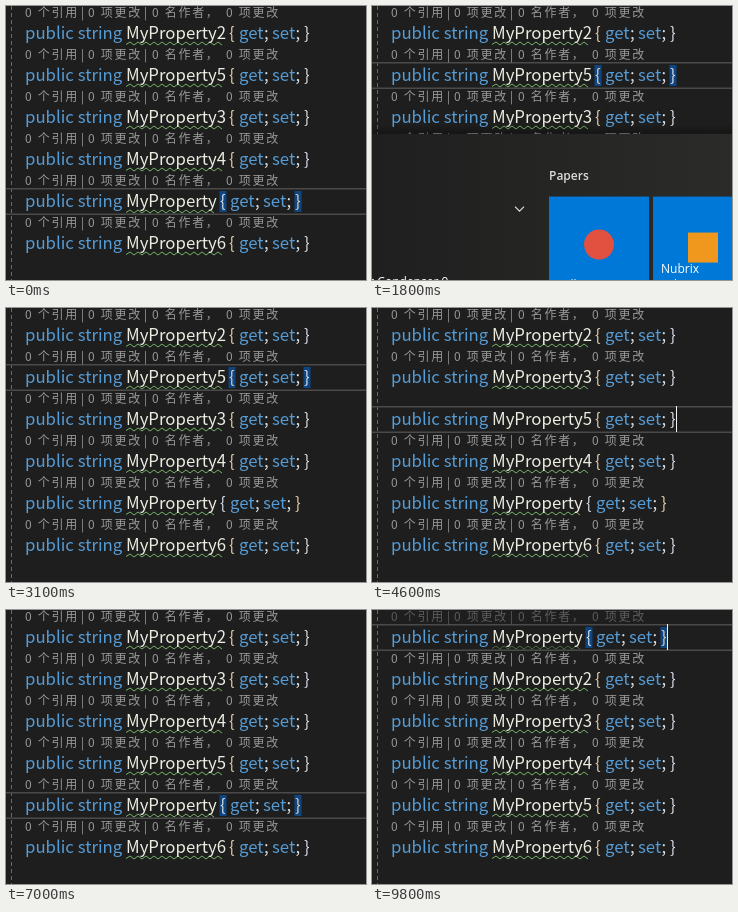
Write an HTML page that moves like this. It is 360x274 px and loops after 9900 ms.

```html
<!DOCTYPE html>
<html lang="zh">
<head>
<meta charset="utf-8">
<title>Moving lines of code</title>
<style>
html, body { margin: 0; width: 100%; height: 100%; overflow: hidden; background: #1e1e1e; }
svg { display: block; width: 360px; height: 274px; }
.code { font: 300 16.8px "Noto Sans CJK SC", "Noto Sans CJK", sans-serif; fill: #dcdcdc; }
.lens { font: 400 12px "Noto Sans CJK SC", "Noto Sans CJK", sans-serif; letter-spacing: 1.7px; fill: #999; }
.menu { font: 400 12px "Open Sans", "Noto Sans", sans-serif; fill: #fff; }
.kw { fill: #569cd6; }
.name { fill: #ecece0; }
.warm { fill: #e2cba6; }
.cold { fill: #d6dce4; }
</style>
</head>
<body>
<svg id="stage" viewBox="0 0 360 274">
  <defs>
    <linearGradient id="pane" x1="0" y1="0" x2="1" y2="0">
      <stop offset="0" stop-color="#1f1f1f"/><stop offset="1" stop-color="#2b2b29"/>
    </linearGradient>
    <linearGradient id="shade" x1="0" y1="0" x2="0" y2="1">
      <stop offset="0" stop-color="#000" stop-opacity="0"/><stop offset="1" stop-color="#000" stop-opacity=".3"/>
    </linearGradient>
  </defs>
  <rect width="360" height="274" fill="#1e1e1e"/>
  <path d="M5.5 0V274" stroke="#686868" stroke-dasharray="4 3"/>
  <g id="cursor">
    <path d="M0 14.75H360M0 40.25H360" stroke="#4a4a4a" stroke-width="1.5"/>
    <g id="marks" fill="#0e4583"><rect y="17" width="7" height="21"/><rect y="17" width="7" height="21"/></g>
  </g>
  <g id="rows"></g>
  <rect id="caret" y="14" width="1" height="26" fill="#f4f4f4"/>
  <g id="menu" class="menu">
    <g id="back">
      <rect y="105" width="360" height="10" fill="url(#shade)"/>
      <rect y="115" width="360" height="300" fill="url(#pane)"/>
    </g>
    <g id="items">
      <text x="177" y="147" font-weight="600" fill="#ddd">Papers</text>
      <path d="M143 174l4.5 4.5l4.5-4.5" fill="none" stroke="#ddd" stroke-width="1.2"/>
      <text x="-2" y="253">t Condenser 9</text>
      <g fill="#0078d7">
        <rect x="177" y="164" width="100" height="99"/><rect x="281" y="164" width="100" height="99"/>
        <rect x="177" y="267" width="100" height="99"/><rect x="281" y="267" width="100" height="99"/>
      </g>
      <circle cx="227" cy="212" r="15" fill="#e2513f"/>
      <rect x="316" y="200" width="30" height="30" fill="#f0981e"/>
      <text x="185" y="256">Zelkin</text>
      <text x="289" y="240">Nubrix</text>
      <text x="289" y="256">Laboratories...</text>
    </g>
  </g>
</svg>
<script>
const LOOP = 9900, PITCH = 42;
const $ = id => document.getElementById(id);

// time, order of the properties, current row
const STATES = [
  [0, "2534P6", 4], [600, "2534P6", 1], [4500, "2354P6", 2],
  [5100, "2345P6", 3], [6300, "2345P6", 4], [7300, "234P56", 3],
  [7600, "23P456", 2], [7900, "2P3456", 1], [8400, "P23456", 0]
];
// times at which the braces light up again after each state
const LIT = [0, 700, 4700, 5300, 6500, 7400, 7700, 8100, 8500];
const CARET_OFF = [[0, 600], [1100, 2600], [3100, 3600], [4100, 4500], [5700, 6100], [7000, 7300], [8900, 9400]];

const within = (t, a, b) => t >= a && t < b;
const shift = id => id === "P" ? 0 : 9;
const move = (el, y) => el.setAttribute("transform", `translate(0 ${y})`);
const fade = (el, a) => el.setAttribute("opacity", a);
const span = (x, cls, s) => `<tspan x="${x}" class="${cls}">${s}</tspan>`;

function wave(x, end) {
  let d = `M${x} 38.5`;
  for (let up = true; x < end - 3; up = !up) d += `L${x += 4} ${up ? 36 : 39}`;
  return d;
}

function makeRow(id) {
  const s = shift(id), g = document.createElementNS("http://www.w3.org/2000/svg", "g");
  const lens = [[19, "0 个引用"], [75, "|"], [82, "0 项更改"], [138, "|"], [146, "0 名作者，"], [220, "0 项更改"]];
  g.innerHTML =
    `<g><text class="lens" y="10.5">${lens.map(([x, w]) => span(x, "", w)).join("")}</text>` +
    `<path d="${wave(120, 210 + s)}" fill="none" stroke="#78b266"/></g>` +
    `<text class="code" y="33">` +
    span(19, "kw", "public string") +
    span(120, "name", "MyProperty" + (s ? id : "")) +
    span(214 + s, s ? "warm" : "cold", "{") +
    span(224 + s, "kw", "get") + "<tspan>;</tspan>" +
    span(257 + s, "kw", "set") + "<tspan>;</tspan>" +
    span(289 + s, s ? "cold" : "warm", "}") + "</text>";
  $("rows").append(g);
  return { g, notes: g.firstChild };
}

const rows = {};
for (const id of "P23456") rows[id] = makeRow(id);

// how far the hints of a freshly moved line have come back
function notes(id, t) {
  if (id === "5" && within(t, 4500, 7000)) return Math.max(0, (t - 6700) / 300);
  if (id === "P" && t >= 7300) return t < 9800 ? 0 : 0.5;
  return 1;
}

function drawMenu(t) {
  const open = within(t, 1600, 2700);
  $("menu").style.display = open ? "" : "none";
  if (!open) return;
  const u = Math.min(1, (t - 1600) / 500);
  const away = t >= 2600 ? 0.3 : (1 - u) ** 3;
  const alpha = t >= 2600 ? 0.45 : Math.min(1, 0.35 + u * 2);
  move($("back"), 60 * away);
  move($("items"), 123 * away);
  fade($("menu"), alpha);
}

function draw(ms) {
  const t = Math.floor(ms % LOOP / 100) * 100;
  const n = STATES.filter(s => s[0] <= t).length - 1;
  const [, order, cur] = STATES[n];
  [...order].forEach((id, i) => {
    move(rows[id].g, i * PITCH);
    fade(rows[id].notes, notes(id, t));
  });
  const s = shift(order[cur]), [left, right] = $("marks").children;
  move($("cursor"), cur * PITCH);
  left.setAttribute("x", 213.5 + s);
  right.setAttribute("x", 288.5 + s);
  fade($("marks"), t >= LIT[n] ? 1 : 0);
  move($("caret"), cur * PITCH);
  $("caret").setAttribute("x", 295 + s);
  fade($("caret"), CARET_OFF.some(([a, b]) => within(t, a, b)) ? 0 : 1);
  drawMenu(t);
}

const start = performance.now();
function tick() {
  draw(performance.now() - start);
  requestAnimationFrame(tick);
}
tick();
</script>
</body>
</html>
```
